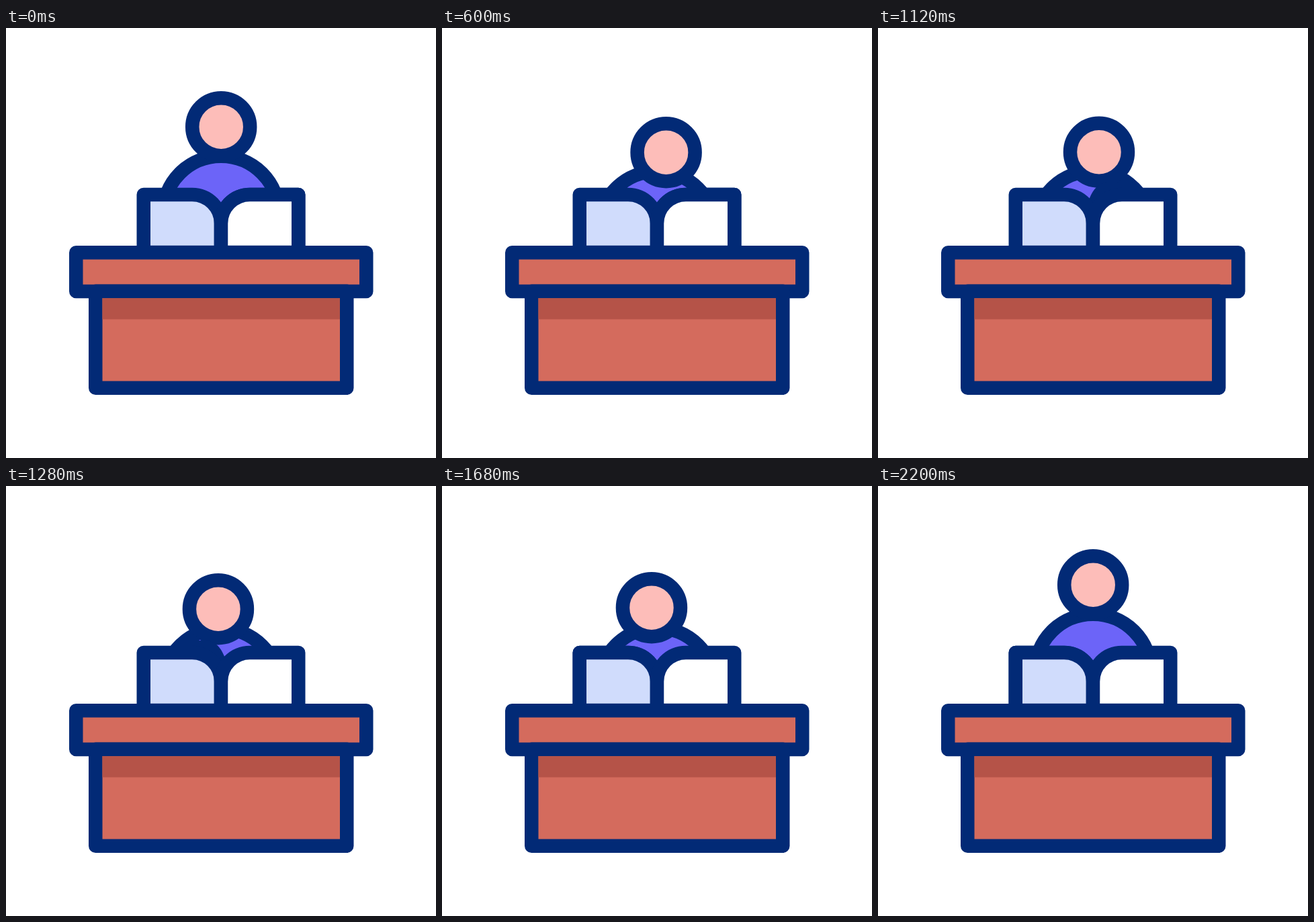
Recreate the animation shown at these times as an HTML page. Size 640x640 px, loop 2400 ms.

```html
<!DOCTYPE html>
<html lang="en">
<head>
<meta charset="utf-8">
<title>Reading at a desk</title>
<style>
  html, body { margin: 0; width: 100%; height: 100%; overflow: hidden; background: #fff; }
  svg { display: block; width: 100%; height: 100%; }
  .line { stroke: #022a76; stroke-width: 20.5; stroke-linejoin: round; stroke-linecap: round; }
</style>
</head>
<body>
<svg viewBox="0 0 640 640">
  <g class="line">
    <circle id="body" cx="320" cy="277" r="86.25" fill="#6c64f8"/>
    <circle id="head" cx="320.2" cy="147.2" r="43" fill="#fdbdb9"/>
    <path id="page" fill="#fff"/>
    <path d="M204.75 334V248H277A43 43 0 0 1 320 291V334Z" fill="#d0dcfc"/>
    <path d="M435.25 334V248H363A43 43 0 0 0 320 291V334Z" fill="#fff"/>
    <rect x="104.25" y="334.25" width="432" height="57.75" fill="#d46b5d"/>
    <rect x="133.25" y="391.75" width="374" height="144" fill="#d46b5d"/>
  </g>
  <path d="M143.5 402H497V433.5H143.5Z" fill="#b55348"/>
</svg>
<script>
  const LOOP = 2400, STEP = 40;
  const [body, head, page] = ['body', 'head', 'page'].map(id => document.getElementById(id));

  // Smooth progress from 0 to 1
  function ease(time, start, duration) {
    const u = Math.min(1, Math.max(0, (time - start) / duration));
    return u * u * (3 - 2 * u);
  }

  const shift = (el, x, y) => el.setAttribute('transform', `translate(${x} ${y})`);

  // The turning page swings around the spine and lifts a little on the way
  function pagePath(angle) {
    const side = Math.cos(angle);
    const top = 248 - 9 * Math.sin(angle);
    const x = 320 + 115.25 * side;
    const curve = 320 + 43 * side;
    const sweep = side > 0 ? 0 : 1;
    return `M${x} 334V${top}H${curve}A${Math.abs(43 * side)} 43 0 0 ${sweep} 320 ${top + 43}V334Z`;
  }

  function draw(time) {
    const down = ease(time, 216, 380);
    const across = ease(time, 1008, 380);
    const up = 1 - ease(time, 1633, 380);
    const lean = down * up;

    shift(head, (13.4 - 22 * across) * lean, (38 - 2.5 * across) * lean);
    shift(body, 0, (22.4 - across) * lean);

    const turn = ease(time, 853, 690);
    page.setAttribute('d', pagePath(Math.PI * turn));
    page.setAttribute('fill', turn < 0.5 ? '#fff' : '#d0dcfc');
  }

  const begin = performance.now();
  function tick() {
    const time = (performance.now() - begin) % LOOP;
    draw(Math.floor(time / STEP) * STEP);
    requestAnimationFrame(tick);
  }
  tick();
</script>
</body>
</html>
```
